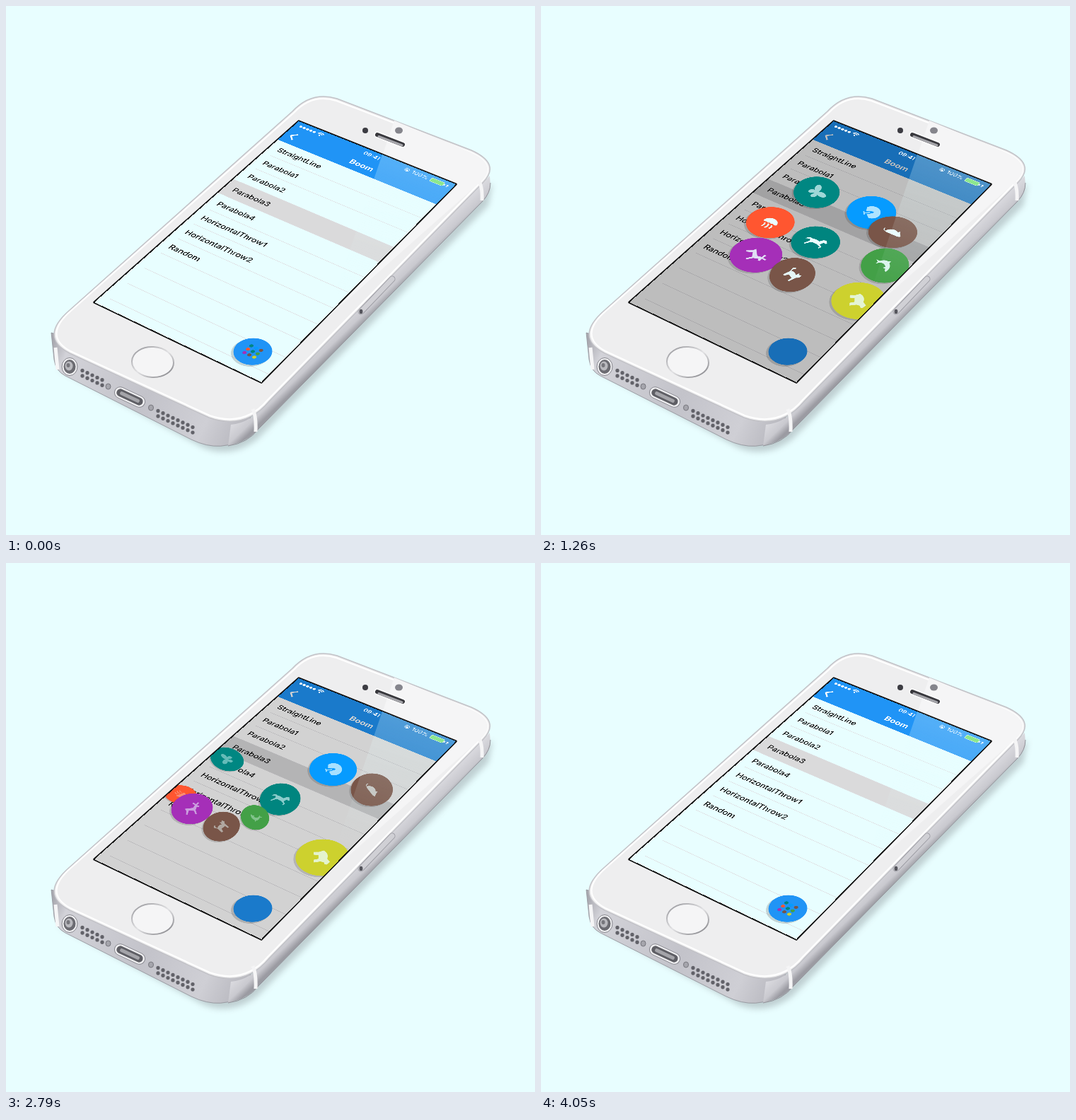
Recreate the animation shown at these times as an HTML page. Size 748 by 748 pixels, loop 4080 ms.

```html
<!DOCTYPE html>
<html lang="en">
<head>
<meta charset="utf-8">
<title>Menu on a phone</title>
<style>
html, body { margin: 0; width: 100%; height: 100%; overflow: hidden; background: #e8feff; }
svg { position: absolute; left: 0; top: 0; }
#screen {
  overflow: hidden; transform-origin: 0 0;
  transform: matrix3d(.30516,.1225,0,-.000065625, -.26629,.18539,0,-.000095335, 0,0,1,0, 414,163,0,1);
}
text { font-family: Inter, "Liberation Sans", sans-serif; }
</style>
</head>
<body>
<svg width="748" height="748" viewBox="0 0 748 748">
  <defs>
    <filter id="blur" x="-10%" y="-10%" width="120%" height="120%"><feGaussianBlur stdDeviation="4"/></filter>
    <linearGradient id="front" gradientUnits="userSpaceOnUse" x1="64" y1="480" x2="340" y2="610">
      <stop offset="0" stop-color="#a9a9b0"/><stop offset=".08" stop-color="#d2d2d8"/>
      <stop offset=".5" stop-color="#c3c3ca"/><stop offset=".8" stop-color="#cfcfd5"/>
      <stop offset="1" stop-color="#b4b4bb"/>
    </linearGradient>
    <linearGradient id="side" gradientUnits="userSpaceOnUse" x1="495" y1="405" x2="522" y2="433">
      <stop offset="0" stop-color="#f3f3f5"/><stop offset=".35" stop-color="#d9d9de"/>
      <stop offset=".75" stop-color="#c9c9cf"/><stop offset="1" stop-color="#9b9ba2"/>
    </linearGradient>
    <linearGradient id="ring" x1="0" y1="0" x2="1" y2="1">
      <stop offset="0" stop-color="#8f8f94"/><stop offset=".5" stop-color="#e2e2e4"/><stop offset="1" stop-color="#77777c"/>
    </linearGradient>
  </defs>
  <path d="M72 512L280 625Q320 640 356 612L682 282 688 250 350 560Z" fill="#8d979b" opacity=".45" filter="url(#blur)"/>
  <path d="M64 462L68 500Q70 516 84 523L262 613Q306 634 340 608L350 560 90 470Z" fill="url(#front)" stroke="#8e8e96" stroke-width=".8"/>
  <path d="M318 592Q345 590 372 560L684 240 685 255Q685 264 674 276L357 598Q342 616 314 622Z" fill="url(#side)"/>
  <path d="M314 622Q342 618 357 598L674 276Q685 264 685 250" fill="none" stroke="#919198"/>
  <path id="face" d="M90 430L405 149Q432 120 468 131L658 204Q700 223 675 249L372 559Q338 600 287 582L90 491Q46 468 90 430Z" fill="#eeeeef" stroke="#c2c2c7" stroke-width="1.5"/>
  <path d="M93 430L407 151Q433 123 467 134L657 207Q695 224 673 247L370 557Q337 596 288 579L91 488Q51 466 93 430Z" fill="none" stroke="#fff" stroke-width="2"/>
  <path d="M549 162L657 207Q695 224 673 247L455 440Z" fill="#f5f5f6"/>
  <g fill="none" stroke="#f5f5f6" stroke-width="5">
    <path d="M669 248Q674 257 673 275M349 570Q354 580 353 602M70 483L73 514"/>
  </g>
  <path d="M502 432L546 386" stroke="#9c9ca3" stroke-width="9" stroke-linecap="round"/>
  <path d="M502 432L546 386" stroke="#d0d0d5" stroke-width="7" stroke-linecap="round"/>
  <ellipse cx="502" cy="432" rx="2.4" ry="3.2" fill="#55555c"/>
  <g id="ports">
    <ellipse cx="90" cy="510" rx="11" ry="12.5" fill="#f2f2f4" stroke="#85858c"/>
    <ellipse cx="90" cy="510" rx="8.5" ry="10" fill="#6c6c72"/>
    <ellipse cx="89" cy="509" rx="5.5" ry="6.5" fill="#b9b9be"/>
    <ellipse cx="88" cy="508" rx="2.5" ry="3" fill="#77777d"/>
    <g transform="translate(175 553) rotate(25)">
      <rect x="-23" y="-8" width="46" height="16" rx="8" fill="#f0f0f2" stroke="#88888f"/>
      <rect x="-20" y="-5.5" width="40" height="11" rx="5.5" fill="#5f5f65"/>
      <rect x="-15" y="-2.5" width="30" height="5" rx="2" fill="#a4a4a9"/>
    </g>
    <g fill="#a5a5ac" stroke="#77777e"><ellipse cx="144.500" cy="538" rx="3.500" ry="4"/><ellipse cx="205" cy="568" rx="3.500" ry="4"/></g>
  </g>
  <ellipse cx="207.500" cy="503.500" rx="29.500" ry="21.500" fill="#f5f5f6" stroke="url(#ring)" stroke-width="2" transform="rotate(3 207.500 503.500)"/>
  <circle cx="508" cy="176" r="4" fill="#3c3c42"/>
  <ellipse cx="555.500" cy="176" rx="5.500" ry="4.500" fill="#85858c"/>
  <path d="M525 182L561 196" stroke="#fff" stroke-width="9" stroke-linecap="round"/>
  <path d="M525 182L561 196" stroke="#38383d" stroke-width="6" stroke-linecap="round"/>
  <path d="M527 184.500L560 197" stroke="#a5a5aa" stroke-width="3" stroke-linecap="round"/>
  <path d="M414 163L636 252 361 532 125 419Z" fill="#111" stroke="#111" stroke-width="3.500" stroke-linejoin="round"/>
</svg>

<svg id="screen" width="640" height="1136" viewBox="0 0 320 568">
  <rect id="list" width="320" height="568"/>
  <rect y="196" width="320" height="44" fill="#dadadb"/>
  <g id="rows" font-size="15.500" font-weight="500" fill="#0c0c0c"></g>
  <rect width="320" height="64" fill="#2094f6"/>
  <path d="M21 33L12 42 21 51" fill="none" stroke="#fff" stroke-width="3"/>
  <text x="160" y="50" font-size="16.500" font-weight="700" fill="#fff" text-anchor="middle">Boom</text>
  <circle cx="270" cy="525" r="30" fill="#000" opacity=".16"/>
  <circle cx="271" cy="521" r="29.500" fill="#2094f6"/>
  <rect id="dim" width="320" height="568"/>
  <g id="menu"></g>
  <g id="status" fill="#fff">
    <text x="160" y="16.500" font-size="12" font-weight="600" text-anchor="middle">09:41</text>
    <text x="257" y="16" font-size="12" text-anchor="middle">100%</text>
    <circle cx="231" cy="12" r="4" fill="none" stroke="#fff"/><path d="M229 11h4v3h-4z"/>
    <path d="M47 9Q53 4 59 9M49 11.500Q53 8 57 11.500" fill="none" stroke="#fff" stroke-width="1.600"/><circle cx="53" cy="14" r="1.500"/>
    <rect x="278" y="7" width="25" height="10" rx="2" fill="#6fe06a" stroke="#d5f5d5"/>
    <path d="M304 10h2v4h-2zM311 7l-3 5h2l-1 5 4-6h-2z"/>
  </g>
</svg>

<svg width="748" height="748" viewBox="0 0 748 748">
  <linearGradient id="gloss" gradientUnits="userSpaceOnUse" x1="560" y1="205" x2="490" y2="415">
    <stop offset="0" stop-color="#e8feff" stop-opacity=".28"/><stop offset="1" stop-color="#e8feff" stop-opacity="0"/>
  </linearGradient>
  <path d="M532 210L636 252 455 436Z" fill="url(#gloss)"/>
</svg>

<script>
const $ = id => document.getElementById(id);
const LOOP = 4080, DURATION = 900, DELAY = 50, OPEN = 252, CLOSE = 2174;
const SPAN = DURATION + 8 * DELAY, MAX_DIM = .335;
const clamp = x => Math.max(0, Math.min(1, x));

// colour, place in the opening order, place in the closing order, icon
const items = [
  ['#008782', 8, 2, 'M0-4C-4-14-17-15-17-9C-17-2-9 1-6 1C-12 3-11 13-6 13C-2 13-1 6 0 3C1 6 2 13 6 13C11 13 12 3 6 1C9 1 17-2 17-9C17-15 4-14 0-4Z'],
  ['#069bff', 7, 7, 'M-13 6A15 14 0 1 1 13 6L4 8 2-2Q0-6-2-2L-4 8ZM-1 2H1V11H4V13H-4V11H-1Z'],
  ['#795548', 3 - 1, 6, 'M-12 4C-9-7 2-8 7-4L10-7 12-3 17 3Q16 6 10 6H-8L-12 5Q-18 4-17-2L-15.500-2Q-16 3-12 4Z'],
  ['#ff5630', 0, 0, 'M-13 1A13 12 0 0 1 13 1Q10 4 6 1Q3 4 0 1Q-3 4-6 1Q-10 4-13 1ZM-9 5q4 5 0 10h3q3-6 0-10ZM-2 4q3 6 0 12h3q3-6 0-12ZM5 5q3 5 0 9h3q3-5 0-9Z'],
  ['#00857f', 1, 5, 'M-19 1Q-17-8-10-5Q-2-7 4-5L8-11 13-13 18-7 16-5 12-6 9 1 15 5 13 10 11 9 12 6 4 3-4 3-8 6-13 13-15 12-10 2-12-2Q-16-1-19 1Z'],
  ['#43a047', 4, 1, 'M15 2Q8-10-3-8L-7-12-8-7Q-14-2-12 6L-17 11-11 10-8 14-8 7Q-6-1 4 0L4 5 8 1Q12 4 15 2Z'],
  ['#a52fb8', 5, 4, 'M-14 0L2-2 5-9 0-13 2-16 7-11 11-16 13-14 9-9 14-6 13-3 9-4 7 4 10 15 7 15 4 6-6 5-8 15-11 15-11 5Z'],
  ['#795548', 3, 3, 'M-9-3Q-2-8 4-4L4-12 7-9 11-12 13-6 10-1 10 13 7 13 6 5-4 5-6 13-10 13-10 4Q-9-1-12-5Q-16-10-10-13L-8-11Q-12-8-9-3Z'],
  ['#cdd12e', 6, 8, 'M-15-2Q-8-10 3-7L10-11 16-6 15-3 11-2 9 3 11 13 5 13 3 6-5 6-6 13-12 13-12 5Z']
];

const labels = ['StraightLine', 'Parabola1', 'Parabola2', 'Parabola3', 'Parabola4', 'HorizontalThrow1', 'HorizontalThrow2', 'Random'];
let rows = '';
for (let i = 0; i < 12; i++) {
  const y = 64 + 44 * i;
  rows += `<path d="M15 ${y + 44}H320" stroke="#deddE1"/><text x="16" y="${y + 28}">${labels[i] || ''}</text>`;
}
$('rows').innerHTML = rows;

for (let i = 0; i < 5; i++) $('status').innerHTML += `<circle cx="${12 + 7 * i}" cy="11" r="2.800"/>`;

// speaker holes along the front edge
let holes = '';
const grille = (x, y, n) => {
  for (let i = 0; i < n * 2; i++) {
    const c = i >> 1, r = i % 2;
    holes += `<ellipse cx="${x + c * 7}" cy="${y + c * 3.3 + r * 7.5}" rx="2.600" ry="2.700" fill="#626269"/>`;
  }
};
grille(108, 515.5, 5);
grille(215, 572.5, 8);
$('ports').innerHTML += holes;

$('menu').innerHTML = items.map(([color, , , icon]) =>
  `<g><circle cx="-1" cy="4" r="40" opacity=".14"/><circle r="40" fill="${color}"/><path d="${icon}" fill="#ebfeff"/></g>`).join('');
const nodes = [...$('menu').children];

// eased travel that overshoots and falls back, with its slope
const travel = p => p * (2.48 - 1.137 * p - .343 * p * p);
const slope = p => 2.48 - 2.274 * p - 1.029 * p * p;

function place(node, i, p) {
  const col = i % 3 - 1, row = Math.floor(i / 3) - 1;
  const x0 = 271 + 9 * col, y0 = 521 + 9 * row;
  const x1 = 160 + 90.5 * col, y1 = 287 + 91 * row;
  // sideways parabola through half the smaller x, midway in y
  const mid = Math.min(x0, x1) / 2;
  const c = 2 * (x0 + x1 - 2 * mid), b = x1 - x0 - c;
  const s = travel(p), size = .08 + .92 * s;
  const vx = (b + 2 * c * s) * slope(p), vy = (y1 - y0) * slope(p);
  const speed = p > 0 && p < 1 ? Math.hypot(vx, vy) : 0;
  const turn = Math.atan2(vy, vx) * 180 / Math.PI;
  const squash = 1 / Math.hypot(1, speed * .0018);
  node.setAttribute('transform', `translate(${x0 + b * s + c * s * s} ${y0 + (y1 - y0) * s}) ` +
    `rotate(${turn}) scale(${squash * size} ${size}) rotate(${-turn})`);
  node.lastChild.setAttribute('transform', `rotate(${720 * s})`);
  node.lastChild.setAttribute('opacity', p);
}

function draw(now) {
  const t = now % LOOP;
  const dim = MAX_DIM * (clamp((t - OPEN) / SPAN) - clamp((t - CLOSE) / SPAN));
  $('dim').setAttribute('opacity', dim);
  $('list').setAttribute('fill', dim > .005 ? '#fff' : '#e8feff');
  items.forEach(([, first, last], i) => {
    const p = t < CLOSE
      ? clamp((t - OPEN - first * DELAY) / DURATION)
      : 1 - clamp((t - CLOSE - last * DELAY) / DURATION);
    place(nodes[i], i, p);
  });
}

const start = performance.now();
(function tick() {
  draw(performance.now() - start);
  requestAnimationFrame(tick);
})();
</script>
</body>
</html>
```
